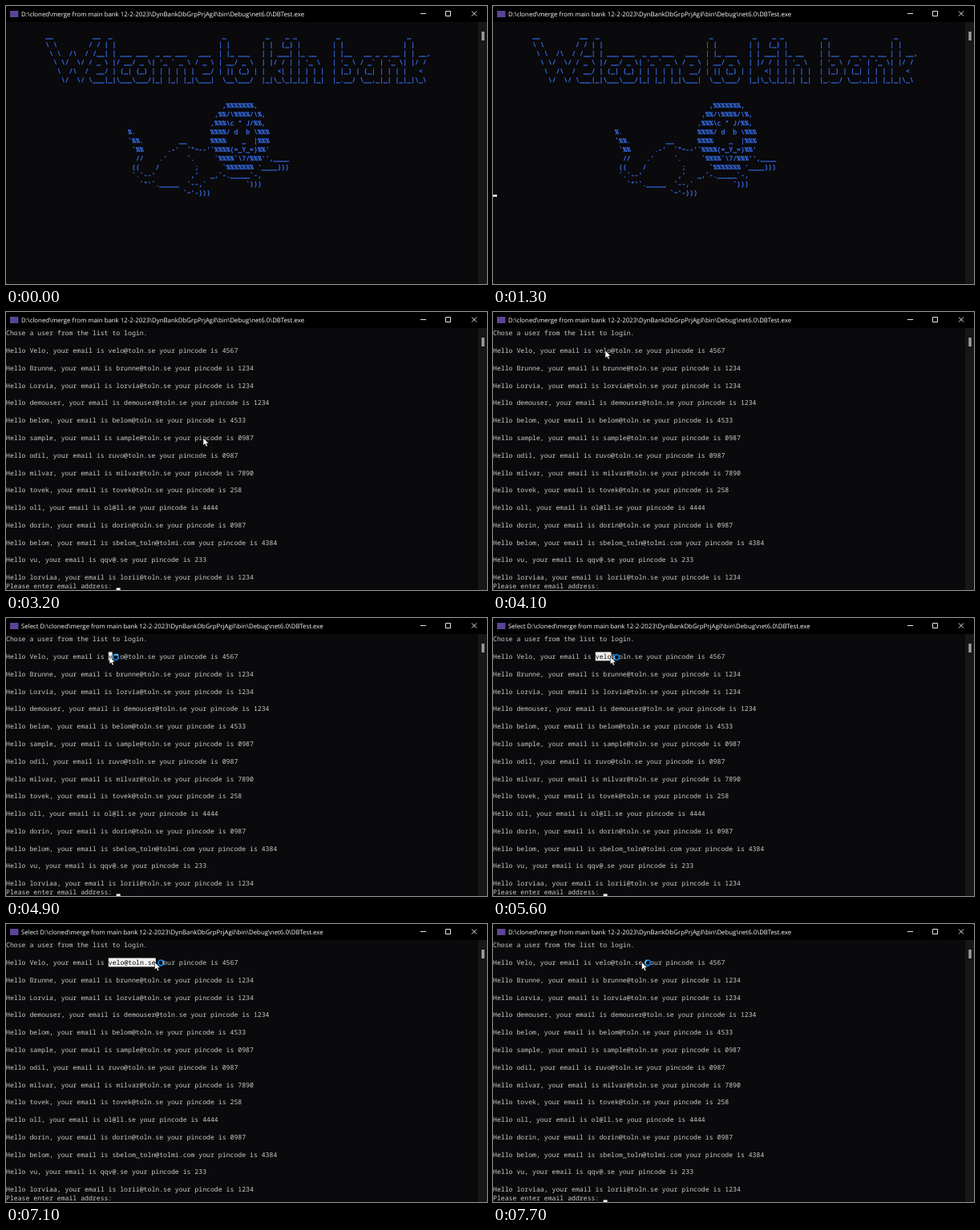
These frames come from a looping animation (600 px wide and 347 px high, 8000 ms). An HTML page:

```html
<!DOCTYPE html>
<html lang="en">
<head>
<meta charset="utf-8">
<title>Console login</title>
<style>
html, body { margin: 0; width: 100%; height: 100%; overflow: hidden; background: #0a090b; }
svg { display: block; width: 100vw; height: 100vh; background: #bbb; }
text { white-space: pre; text-rendering: geometricPrecision; }
.mono { font: 8.19px "Noto Sans Mono", "Liberation Mono", monospace; fill: #ccc; }
.caption { font: 7.835px "Open Sans", "Noto Sans", sans-serif; fill: #fff; }
#art text { fill: #3b78ff; stroke: #3b78ff; stroke-width: .25; }
#picked { fill: #0c0c0c; }
</style>
</head>
<body>
<pre id="banner" hidden>
__          __  _                            _          _    _ _          _                 _
\ \        / / | |                          | |        | |  (_) |        | |               | |
 \ \  /\  / /__| | ___ ___  _ __ ___   ___  | |_ ___   | | ___| |_ __    | |__   __ _ _ __ | | __,
  \ \/  \/ / _ \ |/ __/ _ \| '_ ` _ \ / _ \ | __/ _ \  | |/ / | | '_ \   | '_ \ / _` | '_ \| |/ /
   \  /\  /  __/ | (_| (_) | | | | | |  __/ | || (_) | |   &lt;| | | | | |  | |_) | (_| | | | |   &lt;
    \/  \/ \___|_|\___\___/|_| |_| |_|\___|  \__\___/  |_|\_\_|_|_| |_|  |_.__/ \__,_|_| |_|_|\_\


                                             ,%%%%%%%,
                                           ,%%/\%%%%/\%,
                                          ,%%%\c " J/%%,
                     %.                   %%%%/ d  b \%%%
                     `%%.         __      %%%%    _  |%%%
                      `%%      .-'  `"~--'`%%%%(=_Y_=)%%'
                       //    .'     `.     `%%%%`\7/%%%'',____
                      ((    /         ;      `%%%%%%% '____)))
                      `.`--'         ,'   _,`-._____`-,
                        `"'`._____  `--,`          `)))
                                   `~'-)))
</pre>
<svg viewBox="0 0 600 347" preserveAspectRatio="none">
  <rect width="600" height="347" rx="1.5" fill="#0a090b"/>
  <g id="art"></g>
  <g id="list"></g>
  <rect id="mark" fill="#f2f2f2"/>
  <text id="picked" class="mono"></text>
  <rect id="caret" width="5" height="2.6" fill="#f2f2f2"/>
  <path d="M589 20h11v325.5a1.5 1.5 0 0 1 -1.5 1.5h-9.5z" fill="#171717"/>
  <rect x="593.3" y="32" width="3.4" height="11" fill="#a0a0a0"/>
  <path d="M0 20V1.5A1.5 1.5 0 0 1 1.5 0H598.5A1.5 1.5 0 0 1 600 1.5V20z" fill="#000"/>
  <rect x="5" y="6" width="10.5" height="8" fill="#5b4396"/>
  <text id="caption" class="caption" x="19" y="13"></text>
  <path d="M517 9.5h7M548.5 6.5h6v6h-6zM581 6.5l6 6M587 6.5l-6 6" fill="none" stroke="#fff" stroke-width=".9"/>
  <g id="mouse">
    <path d="M0 0V9.6L2.2 7.6L3.7 11L5.4 10.3L3.9 7H6.9Z" fill="#fff" stroke="#000" stroke-width=".5"/>
    <g id="ring" transform="translate(7.8 .9)" fill="none" stroke-width="1.9">
      <circle r="3.3" fill="#0c0c0c" stroke="#1673c4"/>
      <path id="arc" d="M0 -3.3A3.3 3.3 0 0 1 3.3 0" stroke="#55b8ff"/>
    </g>
  </g>
</svg>
<script>
const CW = 4.915, LH = 10.89, LOOP = 8000;
const PATH = String.raw`D:\cloned\merge from main bank 12-2-2023\DynBankDbGrpPrjAgil\bin\Debug\net6.0\DBTest.exe`;
const EMAIL = 'velo@toln.se', EMAIL_COL = 26, EMAIL_ROW = 2;
const USERS = `Velo ${EMAIL} 4567
Brunne brunne@toln.se 1234
Lorvia lorvia@toln.se 1234
demouser demouser@toln.se 1234
belom belom@toln.se 4533
sample sample@toln.se 0987
odil ruvo@toln.se 0987
milvar milvar@toln.se 7890
tovek tovek@toln.se 258
oll ol@ll.se 4444
dorin dorin@toln.se 0987
belom sbelom_toln@tolmi.com 4384
vu qqv@.se 233
lorviaa lorii@toln.se 1234`.split('\n').map(s => s.split(' '));

const LIST_AT = 1400;
const BLINKS = [100, 700, 1100, 1500, 2100, 2800, 3200, 3700, 4300, 5000, 5500, 6100, 6600, 7100, 7700];
const TRAIL = [
  [2800, 253, 168], [2900, 246, 157], [3200, 246, 157], [3300, 213, 82],
  [3500, 203, 66], [3800, 162, 50], [4100, 140, 48], [4500, 141, 48],
  [4700, 138, 48], [4900, 129, 48], [5400, 129, 48], [6000, 181, 48.5],
  [6300, 181, 48.5], [6400, 185.5, 47.5]
];

const $ = id => document.getElementById(id);
const show = (id, on) => $(id).setAttribute('visibility', on ? 'visible' : 'hidden');
const set = (id, attrs) => { for (const k in attrs) $(id).setAttribute(k, attrs[k]); };
const baseline = row => 29.3 + row * LH;

function addLine(parent, row, col, str) {
  const el = document.createElementNS('http://www.w3.org/2000/svg', 'text');
  el.setAttribute('class', 'mono');
  el.setAttribute('x', col * CW);
  el.setAttribute('y', baseline(row));
  el.textContent = str;
  $(parent).append(el);
}

$('banner').textContent.split('\n').forEach((s, i) => s && addLine('art', i + 1, 10, s));
addLine('list', 0, 0, 'Chose a user from the list to login.');
USERS.forEach(([name, mail, pin], i) =>
  addLine('list', 2 + 2 * i, 0, `Hello ${name}, your email is ${mail} your pincode is ${pin}`));
addLine('list', 29, 0, 'Please enter email address: ');
set('mark', { x: EMAIL_COL * CW, y: 20.7 + EMAIL_ROW * LH, height: LH });
set('picked', { x: EMAIL_COL * CW, y: baseline(EMAIL_ROW) });

function mouseAt(t) {
  const i = TRAIL.findIndex(p => p[0] > t);
  if (i < 0) return TRAIL[TRAIL.length - 1].slice(1);
  if (i === 0) return [0, 0];
  const [t0, x0, y0] = TRAIL[i - 1], [t1, x1, y1] = TRAIL[i];
  const k = (t - t0) / (t1 - t0);
  return [x0 + (x1 - x0) * k, y0 + (y1 - y0) * k];
}

function draw(now) {
  const t = Math.floor(now % LOOP / 100) * 100;
  const listed = t >= LIST_AT;
  show('art', !listed);
  show('list', listed);

  const [row, col] = listed ? [29, 28] : t < 1200 ? [19, 52] : [19, 0];
  set('caret', { x: col * CW, y: 28.6 + row * LH });
  show('caret', BLINKS.filter(b => b <= t).length % 2);

  const [x, y] = mouseAt(t);
  set('mouse', { transform: `translate(${x} ${y})` });
  show('mouse', t >= TRAIL[0][0]);
  show('ring', t >= 4500);
  set('arc', { transform: `rotate(${t * 0.36})` });

  const selecting = t >= 4800 && t < 7400;
  const cells = Math.max(1, Math.min(EMAIL.length, Math.floor((x + 1) / CW) - EMAIL_COL + 1));
  $('caption').textContent = (selecting ? 'Select ' : '') + PATH;
  set('mark', { width: cells * CW });
  $('picked').textContent = EMAIL.slice(0, cells);
  show('mark', selecting);
  show('picked', selecting);
}

const start = performance.now();
function tick() {
  draw(performance.now() - start);
  requestAnimationFrame(tick);
}
tick();
</script>
</body>
</html>
```
